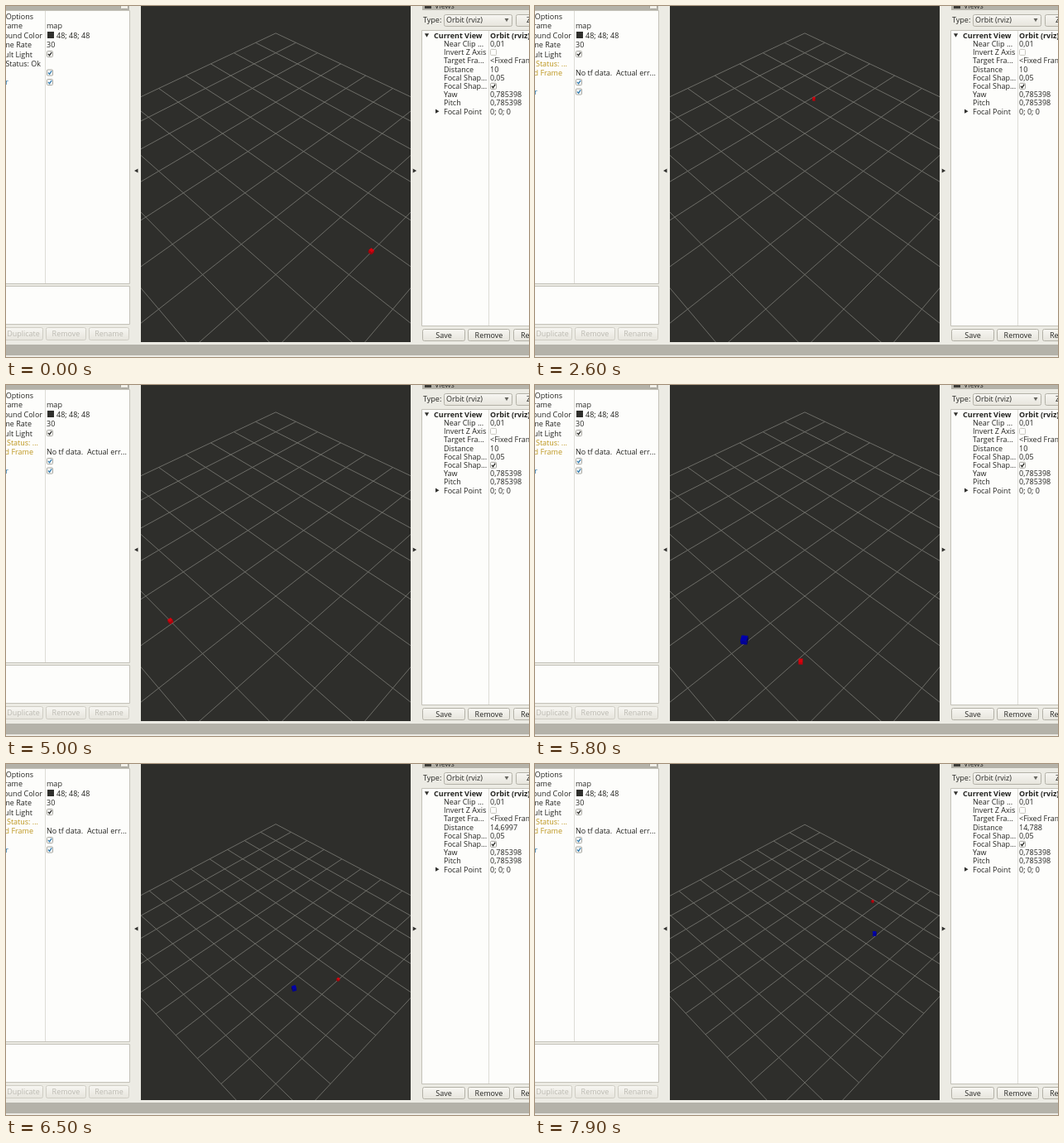
Animation of 632x424 px, one loop 8 s. Source, as an HTML page with a canvas:

```html
<!DOCTYPE html>
<html lang="en">
<head>
<meta charset="utf-8">
<title>Orbit view</title>
<style>
html, body { margin: 0; width: 632px; height: 424px; overflow: hidden; background: #ecebe4; }
canvas { display: block; width: 632px; height: 424px; }
</style>
</head>
<body>
<canvas id="stage" width="632" height="424"></canvas>
<script>
const ctx = document.getElementById('stage').getContext('2d');
const LOOP = 8000, STEP = 100;
const FOCAL = 500, CX = 326, CY = 199.5, S = Math.SQRT1_2;
const INK = '#252522', BG = '#ecebe4', PAPER = '#fdfdfb', EDGE = '#c3c1b8', BAR = '#b4b2a9';

// [seconds, degrees] on a circle of radius 3
const leader = [[0, -49.9], [1.2, 7.5], [2.6, 84.9], [4.2, 178.6], [5.8, 268.5], [6.5, 311.2], [7.9, 390]];
// [seconds, right, forward] on the ground plane
const chaser = [
  [0, 0, -9], [1.2, 1.5, -5.2], [1.5, 2.35, -3.85], [1.8, 3.6, -3], [2.4, 4.4, -1.6],
  [2.9, 3, -0.95], [3.2, 3.5, -3], [3.5, 1.2, -5.6], [3.75, -1.2, -5.2], [3.9, -1.85, -4.1],
  [4.2, -2.249, -1.812], [4.4, -2.7, -1.35], [4.6, -3.15, -1.25], [4.9, -3.3, -1.8],
  [5.2, -2.75, -2.3], [5.5, -2, -2.5], [5.8, -1.2, -2.522], [6.15, -0.33, -2.7],
  [6.5, 0.566, -2.601], [6.85, 1.32, -2.25], [7.2, 1.917, -1.696], [7.55, 2.3, -1], [7.9, 2.457, -0.228]
];
const zoom = [[0, 10], [5.9, 10], [6.5, 14.6997], [6.7, 14.788], [8, 14.788]];

function segment(keys, t) {
  let i = 0;
  while (i < keys.length - 2 && t >= keys[i + 1][0]) i++;
  return [i, Math.min(1, (t - keys[i][0]) / (keys[i + 1][0] - keys[i][0]))];
}

function linear(keys, t) {
  const [i, k] = segment(keys, t);
  return keys[i][1] + (keys[i + 1][1] - keys[i][1]) * k;
}

function slope(keys, i, axis) {
  const a = keys[Math.max(0, i - 1)], b = keys[Math.min(keys.length - 1, i + 1)];
  return (b[axis] - a[axis]) / (b[0] - a[0]);
}

function spline(keys, t, axis) {
  const [i, k] = segment(keys, t);
  const h = keys[i + 1][0] - keys[i][0], k2 = k * k, k3 = k2 * k;
  return (2 * k3 - 3 * k2 + 1) * keys[i][axis] + (k3 - 2 * k2 + k) * h * slope(keys, i, axis)
    + (3 * k2 - 2 * k3) * keys[i + 1][axis] + (k3 - k2) * h * slope(keys, i + 1, axis);
}

// ---- 3D view ----
function project(u, v, z, dist) {
  const scale = FOCAL / (dist + (v - z) * S);
  return [CX + u * scale, CY - (v + z) * S * scale];
}

function drawGrid(dist) {
  const half = 5;
  const at = (x, y) => project((x - y) * S, (x + y) * S, 0, dist);
  ctx.strokeStyle = '#74746f';
  ctx.lineWidth = 0.9;
  ctx.beginPath();
  for (let i = -half; i <= half; i++) {
    ctx.moveTo(...at(i, -half));
    ctx.lineTo(...at(i, half));
    ctx.moveTo(...at(-half, i));
    ctx.lineTo(...at(half, i));
  }
  ctx.stroke();
}

function face(points, rgb, light) {
  ctx.fillStyle = `rgb(${rgb.map(c => Math.round(c * light))})`;
  ctx.beginPath();
  points.forEach(p => ctx.lineTo(...p));
  ctx.closePath();
  ctx.fill();
}

function drawCube(u, v, yaw, size, rgb, dist) {
  const r = size * S, h = size / 2;
  const corner = (i, z) => {
    const a = yaw + Math.PI / 4 + i * Math.PI / 2;
    return project(u + r * Math.cos(a), v + r * Math.sin(a), z, dist);
  };
  for (let i = 0; i < 4; i++) {
    const n = Math.sin(yaw + (i + 1) * Math.PI / 2);
    if (n < 0) face([corner(i, -h), corner(i + 1, -h), corner(i + 1, h), corner(i, h)], rgb, 0.5 - n * 0.35);
  }
  face([0, 1, 2, 3].map(i => corner(i, h)), rgb, 0.95);
}

function drawView(t) {
  const dist = linear(zoom, t);
  ctx.save();
  ctx.beginPath();
  ctx.rect(163, 0, 326, 406);
  ctx.clip();
  ctx.fillStyle = '#2e2e2b';
  ctx.fillRect(163, 0, 326, 406);
  drawGrid(dist);
  const a = linear(leader, t) * Math.PI / 180;
  drawCube(3 * Math.cos(a), 3 * Math.sin(a), a, 0.08, [228, 0, 14], dist);
  const u = spline(chaser, t, 1), v = spline(chaser, t, 2);
  const du = spline(chaser, t + 0.02, 1) - u, dv = spline(chaser, t + 0.02, 2) - v;
  drawCube(u, v, Math.atan2(dv, du), 0.125, [0, 0, 180], dist);
  ctx.restore();
}

// ---- panels ----
function label(s, x, y, color = INK, align = 'left', bold = false) {
  ctx.font = `${bold ? 'bold ' : ''}9px "Open Sans", "Noto Sans", sans-serif`;
  ctx.textAlign = align;
  ctx.fillStyle = color;
  ctx.fillText(s, x, y + 3.2);
}

function box(x, y, w, h, fill, stroke = EDGE, radius = 0) {
  ctx.beginPath();
  ctx.roundRect(x + 0.5, y + 0.5, w - 1, h - 1, radius);
  ctx.fillStyle = fill;
  ctx.fill();
  ctx.strokeStyle = stroke;
  ctx.lineWidth = 1;
  ctx.stroke();
}

function button(s, x, y, w, h, color = INK) {
  const g = ctx.createLinearGradient(0, y, 0, y + h);
  g.addColorStop(0, '#f8f7f3');
  g.addColorStop(1, '#e6e4dc');
  box(x, y, w, h, g, color === INK ? '#b3b1a7' : '#cfcdc4', 2);
  label(s, x + w / 2, y + h / 2, color, 'center');
}

function check(x, y, on, color = INK) {
  box(x, y - 4, 8, 8, PAPER, on ? '#a7a69f' : '#c8c7c0', 1);
  if (!on) return;
  ctx.strokeStyle = color;
  ctx.lineWidth = 1.3;
  ctx.beginPath();
  ctx.moveTo(x + 2, y);
  ctx.lineTo(x + 3.6, y + 1.8);
  ctx.lineTo(x + 6.2, y - 2.2);
  ctx.stroke();
}

function arrow(x, y, angle, r, color = '#30302d') {
  ctx.fillStyle = color;
  ctx.beginPath();
  for (let i = 0; i < 3; i++) {
    const a = angle + i * Math.PI * 2 / 3;
    ctx.lineTo(x + r * Math.cos(a), y + r * Math.sin(a));
  }
  ctx.fill();
}

function divider(x, y, h) {
  ctx.fillStyle = '#dddcd6';
  ctx.fillRect(x, y, 1, h);
}

function drawLeft(t) {
  const warn = t >= 0.5, amber = '#bd951c', blue = '#2e78ac', dim = '#bbb9b1';
  ctx.fillStyle = BAR;
  ctx.fillRect(0, 0, 149, 5);
  box(138, -5, 10, 9, '#f0efe9', '#a5a39a', 1);
  box(-2, 5, 152, 331, PAPER);
  divider(47, 6, 329);
  const names = ['Global Options', 'Fixed Frame', 'Background Color', 'Frame Rate', 'Default Light'];
  [33, 20, 44, 31, 32].forEach((x, i) => label(names[i], x, 12.7 + i * 11.4, INK, 'right'));
  label('map', 49, 24);
  ctx.fillStyle = '#30302d';
  ctx.fillRect(50, 31, 8, 8);
  label('48; 48; 48', 61, 35.5);
  label('30', 49, 47);
  check(49, 58, true);
  if (warn) {
    label('Global Status: ...', 39, 69.7, amber, 'right');
    label('Fixed Frame', 33, 81, amber, 'right');
    label('No tf data.  Actual err...', 49, 81);
  } else {
    label('Global Status: Ok', 42, 69.7, INK, 'right');
  }
  const y = warn ? 92 : 80.5;
  check(49, y, true, blue);
  check(49, y + 11.5, true, blue);
  label('Marker', 3, y + 11.5, blue, 'right');
  box(-2, 338, 152, 47, PAPER);
  button('Duplicate', -3, 388, 48, 16, dim);
  button('Remove', 48, 388, 49, 16, dim);
  button('Rename', 100, 388, 49, 16, dim);
}

function drawRight(t) {
  ctx.fillStyle = BAR;
  ctx.fillRect(503, 0, 129, 5);
  ctx.fillStyle = '#3b3b37';
  ctx.fillRect(506, 0, 8, 3);
  label('Views', 518, -0.3);
  label('Type:', 504, 17);
  button('', 529, 10, 83, 15);
  label('Orbit (rviz)', 532, 17);
  arrow(605, 16.5, Math.PI / 2, 2.8, '#66655f');
  button('', 616, 10, 40, 15);
  label('Zero', 629, 17);
  box(502, 29, 140, 358, PAPER);
  divider(583, 30, 356);
  arrow(508.5, 34.7, Math.PI / 2, 3);
  label('Current View', 517, 35.5, INK, 'left', true);
  label('Orbit (rviz)', 585, 35.5, INK, 'left', true);
  const dist = String(+linear(zoom, t).toPrecision(6)).replace('.', ',');
  const rows = [
    ['Near Clip ...', '0,01'], ['Invert Z Axis', false], ['Target Fra...', '<Fixed Frame>'],
    ['Distance', dist], ['Focal Shap...', '0,05'], ['Focal Shap...', true],
    ['Yaw', '0,785398'], ['Pitch', '0,785398'], ['Focal Point', '0; 0; 0']
  ];
  rows.forEach(([name, value], i) => {
    const y = 45.7 + i * 10.22;
    label(name, 529, y);
    if (typeof value === 'boolean') check(585, y, value);
    else label(value, 585, y);
  });
  arrow(520.5, 127.2, 0, 3);
  button('Save', 503, 390, 52, 15);
  button('Remove', 558, 390, 51, 15);
  button('', 613, 390, 51, 15);
  label('Rename', 622, 397.5);
}

function draw(t) {
  ctx.fillStyle = BG;
  ctx.fillRect(0, 0, 632, 424);
  drawLeft(t);
  drawRight(t);
  arrow(158, 199, Math.PI, 3);
  arrow(493.2, 199, 0, 3);
  ctx.fillStyle = BAR;
  ctx.fillRect(0, 409, 632, 13);
  drawView(t);
}

function tick() {
  const ms = performance.now() % LOOP;
  draw(Math.floor(ms / STEP) * STEP / 1000);
  requestAnimationFrame(tick);
}
tick();
</script>
</body>
</html>
```
